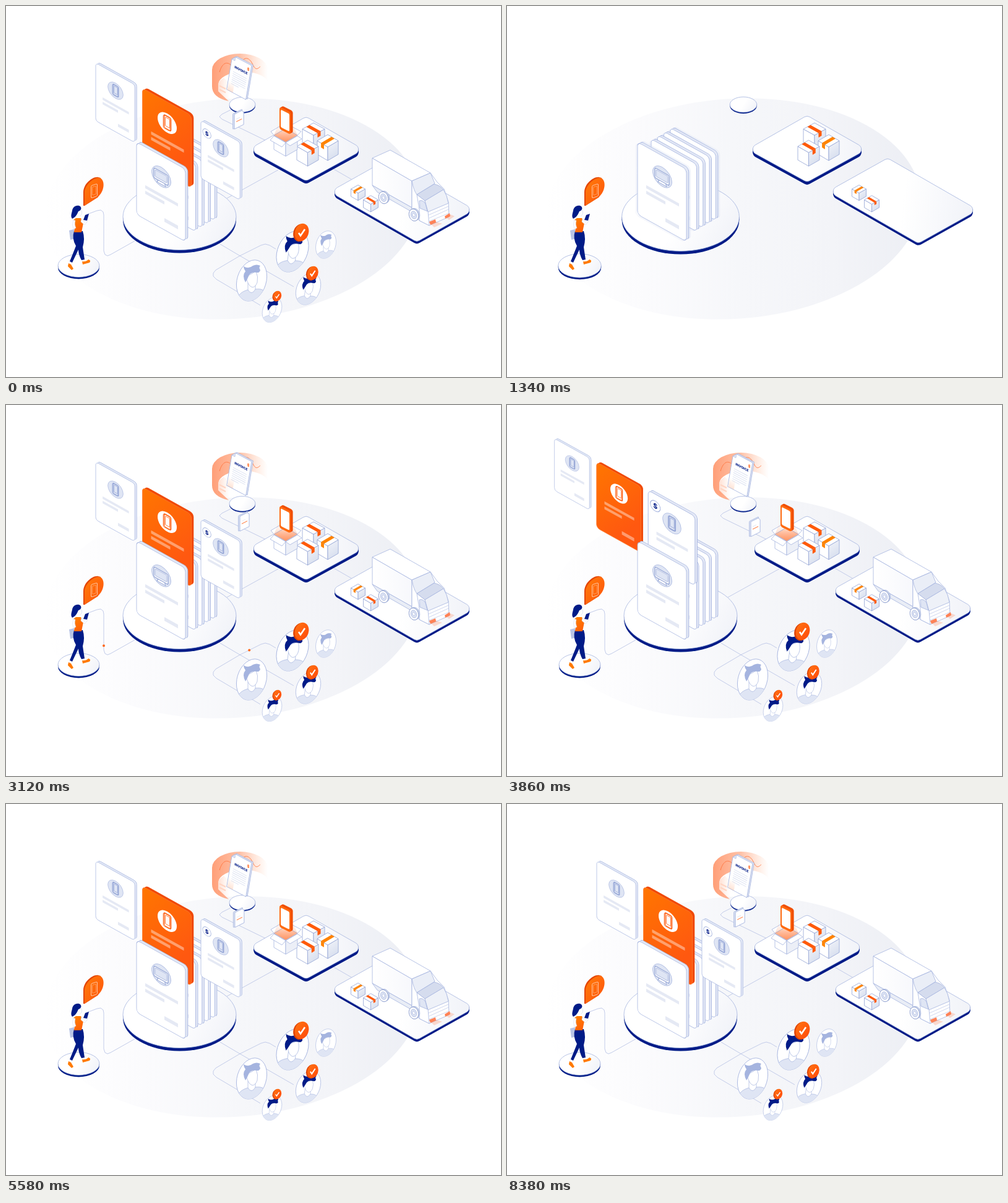
These frames come from a looping animation (800x600 px, 8.4 s). An HTML page with a canvas:

```html
<!DOCTYPE html>
<html lang="en">
<head>
<meta charset="utf-8">
<title>Order flow</title>
<style>
html, body { margin: 0; width: 100%; height: 100%; overflow: hidden; background: #fff; }
canvas { display: block; width: 800px; height: 600px; }
</style>
</head>
<body>
<canvas id="stage" width="800" height="600"></canvas>
<script>
const g = document.getElementById('stage').getContext('2d');
const LOOP = 8400, TAU = Math.PI * 2;
const NAVY = '#001b87', ORANGE = '#ff5a0a', AMBER = '#ff8300';
const LINE = '#a5b4df', PALE = '#dfe5f4', THIN = '#c3cce9', FONT = 'Inter, "Liberation Sans", sans-serif';

const clamp = v => Math.max(0, Math.min(1, v));
const part = (t, start, dur) => clamp((t - start) / dur);
const outCubic = p => 1 - (1 - p) ** 3;
const inOut = p => p < .5 ? 4 * p ** 3 : 1 - (2 - 2 * p) ** 3 / 2;
const outBack = p => p <= 0 ? 0 : 1 + 2.70158 * (p - 1) ** 3 + 1.70158 * (p - 1) ** 2;

function ink(fill, stroke, width = .8) {
  if (fill) { g.fillStyle = fill; g.fill(); }
  if (stroke) { g.strokeStyle = stroke; g.lineWidth = width; g.stroke(); }
}
function poly(pts, fill, stroke, width) {
  g.beginPath();
  for (let i = 0; i < pts.length; i += 2) g.lineTo(pts[i], pts[i + 1]);
  g.closePath();
  ink(fill, stroke, width);
}
function oval(x, y, rx, ry, rot, fill, stroke, width) {
  g.beginPath();
  g.ellipse(x, y, rx, ry, rot, 0, TAU);
  ink(fill, stroke, width);
}
function plate(x, y, w, h, r, fill, stroke, width) {
  g.beginPath();
  g.roundRect(x, y, w, h, r);
  ink(fill, stroke, width);
}
function shape(d, fill, stroke, width) {
  const p = new Path2D(d);
  if (fill) { g.fillStyle = fill; g.fill(p); }
  if (stroke) { g.strokeStyle = stroke; g.lineWidth = width || .8; g.stroke(p); }
}
function grad(x0, y0, x1, y1, ...stops) {
  const k = g.createLinearGradient(x0, y0, x1, y1);
  stops.forEach((c, i) => k.addColorStop(i / (stops.length - 1), c));
  return k;
}
function within(matrix, draw, alpha = 1) {
  g.save();
  g.transform(...matrix);
  g.globalAlpha *= alpha;
  draw();
  g.restore();
}
function pop(x, y, s, draw) {
  if (s > 0) within([s, 0, 0, s, x * (1 - s), y * (1 - s)], draw);
}

// Connecting lines
const routes = {
  user: [131, 337, 147, 331, 153, 330, 157, 333, 158, 338, 158, 396, 160, 402, 164, 404, 169, 402, 208, 380],
  split: [346, 385, 378, 404],
  upper: [378, 404, 412, 387, 419, 385, 426, 387, 436, 393],
  loop: [378, 404, 339, 427, 335, 432, 335, 437, 340, 442, 411, 484],
  lower: [378, 404, 465, 454],
  goods: [357, 311, 440, 265],
  ship: [530, 264, 563, 283],
  bill: [363, 168, 349, 175, 345, 179, 349, 183, 425, 220]
};
const crowd = routes.split.concat(routes.upper.slice(2));
function walk(pts, p) {
  const seg = [];
  let total = 0;
  for (let i = 2; i < pts.length; i += 2) total += seg[seg.push(Math.hypot(pts[i] - pts[i - 2], pts[i + 1] - pts[i - 1])) - 1];
  let left = total * p, done = [pts[0], pts[1]];
  for (let i = 0; i < seg.length; i++) {
    const k = Math.min(1, left / seg[i]), j = i * 2;
    done.push(pts[j] + (pts[j + 2] - pts[j]) * k, pts[j + 1] + (pts[j + 3] - pts[j + 1]) * k);
    if (left <= seg[i]) break;
    left -= seg[i];
  }
  return done;
}
function drawRoutes(t) {
  const p = outCubic(part(t, 1350, 420));
  if (!p) return;
  for (const name in routes) {
    const pts = walk(routes[name], p);
    g.beginPath();
    for (let i = 0; i < pts.length; i += 2) g.lineTo(pts[i], pts[i + 1]);
    ink(null, THIN, 1);
  }
}
const trips = [
  [routes.user, 2400, 1300], [routes.user, 5600, 1300],
  [crowd, 2640, 900], [crowd, 4310, 900], [crowd, 5860, 900],
  [routes.goods, 4420, 900], [routes.goods, 5910, 900],
  [routes.ship, 6000, 700], [routes.ship, 7450, 700]
];
function drawDots(t) {
  for (const [pts, start, dur] of trips) {
    const p = (t - start) / dur;
    if (p <= 0 || p >= 1) continue;
    const [x, y] = walk(pts, p).slice(-2);
    g.globalAlpha = clamp(Math.min(p, 1 - p) * 20);
    oval(x, y, 2, 2, 0, '#ff6a1c');
    g.globalAlpha = 1;
  }
}

// Platforms
function disc(x, y, rx, ry, depth) {
  oval(x, y + depth, rx, ry, 0, NAVY);
  g.fillStyle = NAVY;
  g.fillRect(x - rx, y, rx * 2, depth);
  oval(x, y, rx, ry, 0, grad(x - rx, y - ry, x + rx, y + ry, '#fff', '#fff', '#eef0f7'), LINE);
}
function slab(pts, depth) {
  const trace = dy => {
    g.beginPath();
    g.moveTo((pts[0] + pts[2]) / 2, (pts[1] + pts[3]) / 2 + dy);
    for (let i = 1; i <= 4; i++) {
      const a = i % 4 * 2, b = (i + 1) % 4 * 2;
      g.arcTo(pts[a], pts[a + 1] + dy, pts[b], pts[b + 1] + dy, 8);
    }
    g.closePath();
  };
  for (let d = depth; d > 0; d--) { trace(d); ink(NAVY); }
  trace(0);
  ink(grad(pts[0], pts[1], pts[4], pts[5], '#fff', '#fff', '#f0f2f8'), LINE);
}
function cube(x, y, w, h, d, tape, flip) {
  poly([x - w, y, x, y + h, x, y + h + d, x - w, y + d], '#fff', '#94a4d5');
  poly([x + w, y, x, y + h, x, y + h + d, x + w, y + d], grad(x, y, x + w, y + d, '#f3f5fa', '#d9e0ef'), '#94a4d5');
  poly([x - w, y, x, y - h, x + w, y, x, y + h], '#fff', '#94a4d5');
  const f = flip ? -1 : 1, a = .36, b = .64;
  const spot = (u, v) => [x + f * w * (u + v - 1), y + h * (u - v)];
  const q = spot(1, a), r = spot(1, b);
  poly([...spot(0, a), ...spot(0, b), ...r, ...q], tape);
  poly([...q, ...r, r[0], r[1] + d * .33, q[0], q[1] + d * .33], tape);
}

// Catalogue cards
function phoneIcon(color) {
  plate(35, 23, 11, 21, 2, null, color, 1.5);
  plate(37, 26, 7, 14, .5, null, color, .7);
  plate(33.5, 24, 11, 21, 2, null, color, .6);
}
function card(x, y, s, kind) {
  const hot = kind === 'hot';
  const paint = (dx, dy, draw) => within([s, .557 * s, 0, s, x + dx, y + dy], draw);
  for (let i = 4; i > 0; i--)
    paint(i * .95 * s, -i * .5 * s, () => plate(0, 0, 79, 117, 6, hot ? '#f04a08' : '#eaeef8', hot ? null : LINE, i === 4 ? .9 : .1));
  paint(0, 0, () => {
    plate(0, 0, 79, 117, 6, hot ? grad(0, 0, 80, 60, '#ff7600', '#ff5810') : '#fff', hot ? '#ff7a2c' : LINE, .8);
    const bar = hot ? 'rgba(255,255,255,.4)' : '#e5e9f4';
    g.fillStyle = bar;
    g.fillRect(14, 62, 53, 5);
    g.fillRect(14, 71, 31, 5);
    g.fillRect(45, 98, 22, 6);
    oval(40, 34, 15.5, 15.5, 0, hot ? '#fff' : PALE, hot ? null : LINE, .7);
    if (kind === 'screen') {
      plate(28, 26, 23, 16, 2, '#fff', '#8fa1d3', 1.2);
      plate(30, 28, 19, 11, 1, PALE, '#8fa1d3', .6);
      poly([35, 42, 45, 42, 47, 46, 33, 46], '#fff', '#8fa1d3', .9);
    } else phoneIcon(hot ? ORANGE : '#8b9dd2');
    if (kind === 'price') {
      oval(12, 20, 8.5, 8.5, 0, '#fff', LINE, 1);
      g.fillStyle = NAVY;
      g.font = '700 11px ' + FONT;
      g.textAlign = 'center';
      g.fillText('$', 12, 24);
    }
  });
}
function rearCards() {
  for (let k = 3; k >= 0; k--) card(233 + k * 10.3, 215 - k * 6, .93, 'plain');
}
function ghosted(t, draw) {
  const p = part(t, 900, 560);
  if (!p) return;
  const gap = 3 * (1 - p) + .8;
  if (p < 1) for (const d of [-2, -1, 1, 2]) within([1, 0, 0, 1, d * gap, -d * gap * .4], draw, .16);
  within([1, 0, 0, 1, 0, 0], draw, outCubic(p));
}
function drawCards(t) {
  ghosted(t, rearCards);
  const q = inOut(part(t, 3480, 520)) - inOut(part(t, 4700, 460));
  const list = [
    [145, 92, .8, -74, -41, -.09, 'plain'],
    [220.5, 133, 1, -82, -44, -.1, 'hot'],
    [315, 185, .8, -94, -51, .17, 'price']
  ];
  list.forEach(([x, y, s, dx, dy, ds, kind], i) => {
    const p = part(t, 1380 + i * 60, 480), e = outCubic(p);
    if (p) within([1, 0, 0, 1, (235 - x) * (1 - e), (195 - y) * (1 - e)],
      () => card(x + dx * q, y + dy * q, s + ds * q, kind), clamp(p * 3));
  });
  ghosted(t, () => card(211, 220, 1, 'screen'));
}

// User with phone
function drawUser() {
  poly([102, 363, 110, 361, 112, 376, 104, 378], '#b9c5e6');
  shape('M110 364 L124 364 Q128 376 124 390 L127 410 L122 411 Q117 402 117 394 L107 415 L103 413 Q110 396 113 388 Q106 376 110 364Z', NAVY);
  shape('M101 416 L105 418 L109 425 L106 427 L100 421Z', '#ff7a00');
  shape('M123 413 Q129 414 133 410 Q138 411 135 415 L124 418Z', '#ff7a00');
  oval(118, 334, 4.5, 6, 0, '#fff', THIN, .5);
  poly([113, 338, 119, 338, 120, 346, 112, 346], '#fff');
  shape('M107 331 C108 323 116 321 120 324 C123 327 121 331 117 332 C115 337 112 342 107 344 C104 340 106 336 107 331Z', NAVY);
  shape('M109 346 L113 343 L121 343 L125 351 L122 366 L110 366 Q112 357 109 346Z', grad(109, 342, 125, 367, '#ff8400', ORANGE));
  shape('M122 344 L127 350 L131 345 L132 348 L127 354 L121 349Z', '#fff', '#cfd7ec', .5);
  shape('M109 346 Q106 353 109 361 L113 359 Q110 353 112 347Z', '#fff', '#cfd7ec', .5);
  poly([125, 346, 128, 338, 134, 336, 131, 347], NAVY);
}
function drawBubble() {
  shape('M125 323 L125 301 C125 287 141 275 149 277 L153 278 L149 309 L127 323Z', '#e44400');
  shape('M127 323 L127 302 C127 289 143 276 152 278 C161 282 159 301 148 309 C140 315 133 318 127 323Z', grad(127, 285, 157, 305, '#ff7a08', '#ff5a0c'));
  within([1, -.3, 0, 1, 137.5, 290.5], () => {
    plate(0, 0, 10, 20, 2, null, '#ffc59f', 1);
    plate(2, 3, 6, 13, .5, null, '#ffc59f', .5);
  });
}

// Invoice and its projected ring
function drawRing() {
  shape('M333 103 A45 26 0 0 1 423 103 L423 121 A41 21 0 0 0 343 126 L343 138 L360 154 Q333 148 333 130Z',
    grad(333, 0, 423, 0, 'rgba(255,95,30,.6)', 'rgba(255,125,70,.48)', 'rgba(255,160,110,0)'));
  shape('M343 126 Q345 120 352 116 L362 126 L360 154 L343 143Z', grad(343, 0, 362, 0, 'rgba(255,150,105,.3)', 'rgba(255,190,160,0)'));
  shape('M345 107 C350 90 358 90 364 96 S374 104 380 92 S394 84 399 95 S408 100 411 98', null, '#ff7842', .9);
  shape('M345 129 L355 134 M345 135 L355 140', null, '#ffd5c3', 2);
}
function drawInvoice(t) {
  const lift = -2.5 * (1 + Math.cos(TAU * (t - 3120) / 3620));
  within([1, .53, -.17, 1, 366, 80 + lift], () => {
    const d = 'M5 0 L31 0 L31 55 L0 55 L0 6Z';
    within([1, 0, 0, 1, 2, -2], () => shape(d, '#e3e8f5', LINE));
    shape(d, '#fff', LINE);
    shape('M5 0 L5 6 L0 6Z', PALE, LINE, .5);
    g.fillStyle = NAVY;
    g.font = '800 5px ' + FONT;
    g.textAlign = 'left';
    g.fillText('INVOICE', 6, 17);
    g.fillStyle = ORANGE;
    g.font = '700 6px ' + FONT;
    g.fillText('$', 25, 10);
    for (let i = 0; i < 7; i++) {
      g.fillStyle = '#d5dcef';
      g.fillRect(5, 23 + i * 3.2, i === 6 ? 12 : 22, .8);
    }
    g.fillStyle = grad(0, 40, 0, 56, 'rgba(255,140,80,0)', 'rgba(255,140,80,.25)');
    g.fillRect(1, 40, 9, 15);
  });
}
function drawNote(t) {
  const T = 2835, age = (t - 1553 + T) % T, x = 350 + age * .0217;
  if (t < 1553) return;
  within([1, -.5, 0, 1, x - 6, 174.5 + (x - 374) * .55], () => {
    plate(-2.5, -2, 15, 25, 1, '#dce3f2', LINE, .7);
    shape('M0 0 L12 0 L15 4 L15 24 L0 24Z', '#fff', LINE, .8);
    g.fillStyle = '#ff8a55';
    g.fillRect(3, 13, 9, 1.2);
    g.fillStyle = PALE;
    g.fillRect(3, 9, 6, .8);
  }, clamp(Math.min(age, T - age) / 200));
}

// Open parcel with the phone
function drawParcel(t) {
  poly([433, 209, 452, 198, 471, 209, 452, 220], grad(0, 196, 0, 220, '#ffeee6', '#ffae88'), LINE);
  poly([433, 209, 452, 198, 447, 192, 428, 203], '#fff', LINE);
  poly([452, 198, 471, 209, 477, 203, 458, 193], '#fff', LINE);
  poly([433, 210, 452, 221, 452, 243, 433, 232], '#fff', LINE);
  poly([452, 221, 471, 210, 471, 232, 452, 243], '#eceff7', LINE);
  poly([433, 210, 452, 221, 446, 228, 427, 217], '#fff', LINE);
  poly([452, 221, 471, 210, 478, 215, 459, 226], '#fff', LINE);
  poly([440, 192, 464, 192, 471, 209, 452, 220, 433, 209], grad(0, 192, 0, 220, 'rgba(255,120,60,0)', 'rgba(255,115,50,.42)'));
  const rise = 22 * (1 - outCubic(part(t, 1560, 380))) - 1.5 * (1 - Math.cos(TAU * t / 2800));
  for (let i = 4; i >= 0; i--) within([1, .5, 0, 1, 442 + i * .9, 163 - i * .5 + rise], () => {
    plate(0, 0, 18, 36, 3.5, i ? '#f04f04' : '#ff6a10');
    if (!i) plate(2, 3.5, 14, 28.5, 2, '#fff');
  });
}

function wheel(x, y) {
  oval(x + 2, y - 1, 7.5, 10, -.3, '#ccd5ea', LINE);
  oval(x, y, 7.5, 10, -.3, '#fff', '#8fa0d0', 1);
  oval(x, y, 4.5, 6.3, -.3, PALE, LINE);
  oval(x, y, 2, 3, -.3, '#fff', LINE);
}
function drawTruck() {
  poly([592, 246, 656, 283, 656, 326, 592, 290], grad(592, 0, 656, 0, '#fff', '#f7f8fc'), LINE);
  poly([592, 246, 621, 233, 686, 270, 656, 283], '#fff', LINE);
  poly([592, 290, 656, 326, 656, 333, 600, 301], '#e9edf6', LINE);
  shape('M656 283 L686 270 L697 285 L708 296 L715 317 L716 341 L684 355 L668 347 L656 329Z', '#fff', LINE);
  shape('M656 283 L686 270 L693 287 L664 305 Q659 299 656 283Z', '#eaeef7', LINE);
  shape('M664 305 L692 288 Q702 290 707 297 L677 315Z', '#d5dcee', LINE);
  shape('M664 305 L677 315 L682 332 L684 355 L668 347 L668 329Z', '#fff', LINE);
  shape('M668 315 Q674 313 678 320 L681 332 L669 327Z', PALE, LINE);
  shape('M677 315 L707 297 Q713 306 715 319 L682 333Z', '#eef1f8', LINE);
  shape('M683 338 L715 324 M684 343 L715 329 M684 348 L716 335', null, THIN);
  wheel(610, 310);
  wheel(659, 338);
  poly([684, 349, 694, 345, 695, 350, 686, 354], '#ff8358');
  poly([709, 340, 717, 335, 718, 340, 710, 344], '#ff8358');
  poly([686, 352, 695, 349, 705, 352, 692, 358], 'rgba(255,125,70,.25)');
  poly([710, 341, 718, 337, 725, 340, 716, 346], 'rgba(255,125,70,.25)');
}

// Customers
function avatar(x, y, s, hair, tilt) {
  within([s, 0, 0, s, x, y], () => {
    g.save();
    g.rotate(tilt);
    oval(0, 0, 23.5, 34, .3, '#fff', LINE, .9);
    g.clip();
    shape('M-26 38 C-23 22 -16 18 -6 15 L6 14 C15 13 21 14 23 24 L22 38Z', PALE, LINE, .7);
    shape('M-6 4 L-6 15 Q0 25 6 14 L6 4Z', '#fff', LINE, .7);
    shape('M-9 -6 L7 -15 Q11 -6 9 3 Q6 11 1 11 Q-6 9 -9 -6Z', '#fff', LINE, .7);
    shape('M-10 3 Q-16 -8 -10 -15 Q-13 -19 -13 -23 Q-5 -18 2 -24 Q8 -27 14 -24 Q11 -21 14 -17 Q13 -12 8 -13 Q0 -14 -4 -9 Q-6 -4 -10 3Z', hair);
    g.restore();
  });
}
function badge(x, y, s) {
  within([s, 0, 0, s, x, y], () => {
    oval(-1.5, .8, 11, 14.5, .3, '#df4200');
    oval(1, 0, 11, 14.5, .3, grad(-10, -8, 10, 8, '#ff7010', '#ff4f0c'));
    shape('M-4 1 L-1 5.5 L6 -5', null, '#fff', 2.6);
  });
}
const people = [
  [397, 444, 1, LINE, 0], [463, 397, 1.02, NAVY, 20], [517, 386, .67, LINE, 30],
  [488.5, 457.5, .79, NAVY, 10], [430, 491.5, .62, NAVY, 0]
];
const badges = [[477, 366, 1], [495, 432, .79], [438, 469, .58]];

function backdrop() {
  oval(365, 328, 304, 178, -.07, grad(62, 340, 675, 300, '#ffffff', '#fbfbfd', '#f6f7fa', '#f3f4f8', '#eceef4'));
}

function render(t) {
  g.clearRect(0, 0, 800, 600);
  backdrop();
  drawRoutes(t);
  const base = outBack(part(t, 480, 1040));
  const seen = outBack(part(t, 620, 420));
  const late = outBack(part(t, 1350, 870));

  pop(382, 160, base, () => disc(382, 159.5, 21, 12, 2));
  pop(378, 115, late, drawRing);
  if (late) pop(378, 120, late, () => drawInvoice(t));
  drawNote(t);

  pop(640, 317, base, () => slab([523, 300.5, 616, 248.5, 757, 329.5, 664, 381.5], 4));
  pop(569, 301, seen, () => cube(569, 296, 11.5, 6.5, 12, AMBER, true));
  pop(589, 320, seen, () => cube(589.5, 313.5, 12, 7, 12.5, ORANGE));
  const ride = part(t, 1400, 560), miss = 1 - outBack(ride);
  if (ride) within([1, 0, 0, 1, -70 * miss, -40 * miss], drawTruck, clamp(ride * 4));

  pop(485, 233, base, () => slab([392, 232, 485, 179, 578, 232, 485, 283], 5));
  pop(497, 208, seen, () => cube(497, 199, 18, 10, 22, ORANGE));
  pop(520, 230, seen, () => cube(520, 218, 17, 10, 22, AMBER, true));
  pop(488, 238, seen, () => cube(487.5, 227, 17.5, 10, 22, ORANGE));
  pop(452, 230, outBack(part(t, 1400, 480)), () => drawParcel(t));

  pop(280.5, 342, base, () => disc(280.5, 341, 91.5, 53.5, 5));
  drawCards(t);

  pop(117.5, 421, base, () => disc(117.5, 420, 33.5, 18.5, 3));
  pop(117, 415, seen, drawUser);
  pop(127, 322, seen, drawBubble);

  const chosen = .12 * inOut(part(t, 2600, 450));
  for (const [x, y, s, hair, wait] of people)
    pop(x, y, outBack(part(t, 1730 + wait, 425)), () => avatar(x, y, s, hair, hair === NAVY ? chosen : 0));
  badges.forEach(([x, y, s], i) => pop(x, y, outBack(part(t, 2600 + i * 70, 360)), () => badge(x, y, s)));
  drawDots(t);
}

const begin = performance.now();
function tick() {
  const t = Math.max(0, performance.now() - begin) % LOOP;
  // The loop opens on the finished scene, then builds it from nothing.
  render(t < 20 ? 8380 : t);
  requestAnimationFrame(tick);
}
tick();
</script>
</body>
</html>
```
